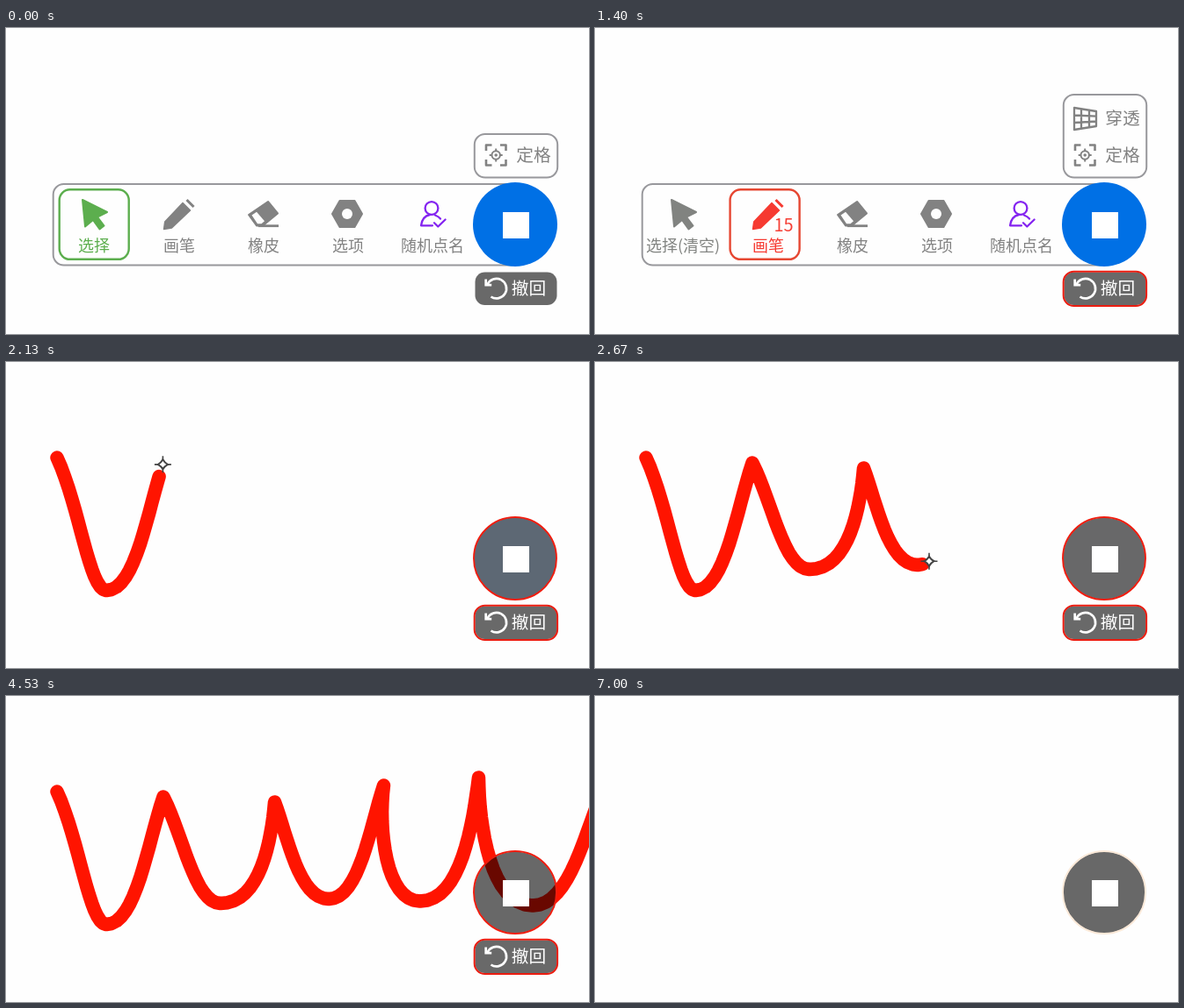
These frames come from a looping animation (663 by 349 pixels, 7070 ms). An HTML page:

```html
<!DOCTYPE html>
<html lang="zh-CN">
<head>
<meta charset="utf-8">
<title>画笔工具栏</title>
<style>
  html, body { margin: 0; width: 663px; height: 349px; overflow: hidden; background: #fefefe; }
  svg { display: block; font-family: "Noto Sans CJK SC", "Noto Sans CJK", "Noto Sans", sans-serif; }
  text { text-anchor: middle; font-size: 18px; stroke: none; }
  .big { font-size: 19.7px; }
  .line { fill: none; }
  .frame { fill: #fefefe; stroke: #98989c; stroke-width: 2; }
  .item { fill: currentColor; stroke: currentColor; stroke-width: 0; stroke-linejoin: round; color: #828282; }
</style>
</head>
<body>
<svg width="663" height="349" viewBox="0 0 663 349">
  <rect id="bar" class="frame" y="178" height="92.5" rx="12"/>

  <g id="random" class="item">
    <g class="line" stroke="#8424f0" stroke-width="2.3" stroke-linecap="round">
      <circle cx="484" cy="205.5" r="7.4"/>
      <path d="M485 225.3H472C473 218 477 214 482 213M488 213.5Q492 215 494 217.5M487 222.3l4.3 4.2 8.3-8"/>
    </g>
    <text x="485" y="254.5">随机点名</text>
  </g>
  <g id="option" class="item">
    <path d="M379.5 197h17l8.5 15-8.5 15h-17l-8.5-15z" stroke-width="2"/>
    <circle cx="388" cy="212" r="6" fill="#fefefe" stroke="none"/>
    <text x="389" y="254.5">选项</text>
  </g>
  <g id="eraser" class="item">
    <path d="M276 213l22-15 11 13.5-17 14h-7z" stroke-width="2"/>
    <path d="M279.5 213.5l5.5-3.7 9 10.5-3.5 3H286z" fill="#fefefe" stroke="none"/>
    <path d="M287 225.7H310" stroke-width="2.8"/>
    <text x="293" y="254.5">橡皮</text>
  </g>
  <g id="select" class="item">
    <path d="M87 196l28 14-11 5.5 7.5 10-5 4-7.5-10.5-9 7.5z" stroke-width="2"/>
    <text id="selectLabel" x="100" y="254.5"></text>
  </g>
  <g id="pen" class="item">
    <path d="M179.5 229.5l1.2-8.5 20.3-21.5 8.5 8.5-21 20z" stroke-width="1.5"/>
    <path d="M205.5 196l8 8" stroke-width="3"/>
    <text x="197" y="254.5">画笔</text>
    <text id="size" x="214.5" y="231.5" style="font-size:20px">15</text>
  </g>
  <rect id="pick" class="line" y="184.3" width="79" height="79.5" rx="12" stroke-width="2.4"/>

  <g id="panel">
    <rect id="panelBox" class="frame" x="532.8" width="94.4" rx="12"/>
    <g class="item">
      <g class="line" stroke-width="2.6">
        <path d="M546 140v-6.5h6.5M562 133.5h6.5v6.5M568.5 150v6.5h-6.5M552.5 156.5h-6.5v-6.5"/>
        <path d="M557.2 137.5v3M557.2 149.5v3M549.7 145h3M561.7 145h3" stroke-width="2"/>
        <circle cx="557.2" cy="145" r="4.7" stroke-width="2"/>
      </g>
      <circle cx="557.2" cy="145" r="1.8"/>
      <text class="big" x="600" y="152">定格</text>
    </g>
    <g id="through" class="item">
      <path class="line" stroke-width="2.3" d="M545 91l25 4v17l-25 4zM553 92.3v22.4M562 93.7v19.6M545 99.5l25 1.2M545 108l25-1.5"/>
      <text class="big" x="600" y="110">穿透</text>
    </g>
  </g>

  <path id="ink" class="line" stroke="#ff1400" stroke-width="15.5" stroke-linecap="round" stroke-linejoin="round"/>

  <circle id="button" cx="579" cy="224" r="48"/>
  <circle id="ring" class="line" cx="579" cy="224" r="47" stroke-width="1.9"/>
  <rect x="565" y="210" width="30" height="30" fill="#fff"/>

  <g id="undo">
    <rect x="533.5" y="278.5" width="93" height="37.5" rx="11" fill="#696969"/>
    <rect id="undoEdge" class="line" x="532.7" y="277.8" width="94.4" height="39.2" rx="12" stroke="#eb1c10" stroke-width="2"/>
    <g class="line" stroke="#fff" stroke-width="2.7">
      <path d="M547.5 292.5A11.3 11.3 0 1 1 551.5 306.5"/>
      <path d="M545.7 286.5v6.7h6.5"/>
    </g>
    <text class="big" x="594.5" y="303.5" fill="#fff">撤回</text>
  </g>

  <g id="cursor" fill="#fff" stroke="#444" stroke-width="2">
    <path d="M0-9.5v5M0 4.5v5M-9.5 0h5M4.5 0h5" stroke-width="1.6"/>
    <path d="M0-5.5Q2-2 5.5 0Q2 2 0 5.5Q-2 2-5.5 0Q-2-2 0-5.5z"/>
  </g>
</svg>
<script>
const LOOP = 7070, TICK = 200 / 3;
const PICK = 1000, FOLD = 1670, DRAW = 1810, UNDO = 6530;
const GREEN = [92, 174, 78], GREY = [130, 130, 130], RED = [250, 56, 46];
const INK = [240, 28, 14], CREAM = [251, 233, 216];
const ITEMS = ['select', 'pen', 'eraser', 'option', 'random'];

// Turning points of the stroke: x, y and how far each swing bows outwards
const TURNS = [
  [58, 109, 0], [114, 260.5, 0.44], [179, 115, 0.62], [244, 236.5, 0.55], [305.5, 121, 0.84], [367, 231.5, 0.65],
  [429.5, 102, 0.65], [471, 234, 1.05], [537.5, 93, 0.8], [599, 239, 0.89], [682, 100, 0.62]
];
const SWINGS = TURNS.length - 1;

const $ = id => document.getElementById(id);
const set = (id, attrs) => { for (const k in attrs) $(id).setAttribute(k, attrs[k]); };
const show = (id, on) => set(id, { visibility: on ? 'visible' : 'hidden' });
const clamp = (v, lo = 0, hi = 1) => Math.max(lo, Math.min(hi, v));
const settle = (t, start, tau) => t < start ? 0 : 1 - Math.exp((start - t) / tau);
const mix = (a, b, p) => `rgb(${a.map((v, i) => v + (b[i] - v) * p)})`;
const bezier = (a, b, c, d, s) => {
  const r = 1 - s;
  return a * r * r * r + 3 * b * r * r * s + 3 * c * r * s * s + d * s * s * s;
};

// Each swing is a cubic, flat at its trough and steep at its peak
function pointAt(u) {
  const i = Math.min(Math.floor(u), SWINGS - 1), falling = i % 2 === 0;
  const bow = TURNS[i + 1][2];
  const [peak, trough] = falling ? [TURNS[i], TURNS[i + 1]] : [TURNS[i + 1], TURNS[i]];
  const dx = peak[0] - trough[0], dy = peak[1] - trough[1];
  const s = falling ? 1 - (u - i) : u - i;
  return [
    bezier(trough[0], trough[0] + (bow - 0.1) * dx, trough[0] + (bow + 0.1) * dx, peak[0], s),
    bezier(trough[1], trough[1], trough[1] + 0.63 * dy, peak[1], s)
  ];
}

function trace(end) {
  const pts = [];
  for (let k = 0; k / 16 < end; k++) pts.push(pointAt(k / 16));
  pts.push(pointAt(end));
  return 'M' + pts.map(p => p.map(v => v.toFixed(1))).join('L');
}

function drawBar(t) {
  const picked = t >= PICK - 1;
  const p = picked ? settle(t, 930, 137) : 0;
  const slow = picked ? settle(t, 930, 230) : 0;
  const fold = settle(t, FOLD, 252);
  const fade = clamp(1 - (t - FOLD) / 370), dim = Math.sqrt(fade);
  const shift = i => (504 - 96.3 * i) * fold;

  ITEMS.forEach((id, i) => set(id, { transform: `translate(${shift(i)} 0)`, opacity: fade }));
  $('select').style.color = mix(GREEN, GREY, p);
  $('pen').style.color = mix(GREY, RED, p);
  $('selectLabel').textContent = picked ? '选择(清空)' : '选择';
  set('size', { opacity: p });

  const left = 53.7 + 500 * fold;
  set('bar', { x: left, width: Math.max(0, 585 - left), opacity: dim });
  set('pick', { x: 60.7 + 96 * p + shift(1), stroke: mix(GREEN, RED, slow), opacity: dim });

  set('panelBox', { y: picked ? 76 : 121, height: picked ? 94.5 : 49.5 });
  set('panel', { opacity: clamp(1 - (t - FOLD) / 130) });
  show('through', picked);
  show('undoEdge', picked);
}

function drawButton(t) {
  const p = settle(t, 1755, 165);
  const gone = clamp((t - UNDO + 60) / 530);
  const alpha = 1 - 0.412 * p;
  const tint = [0, 112, 229].map(v => v * (1 - p) / alpha);
  set('button', { fill: `rgba(${tint},${alpha})`, r: 48 - 1.4 * p });
  set('ring', { stroke: mix(INK, CREAM, gone), opacity: clamp((t - 1800) / 300) });
  set('undo', { opacity: 1 - gone });
}

function drawInk(t) {
  const u = clamp((t - DRAW) / 169.4, 0.03, SWINGS);
  const inked = t > DRAW - 20 && t < UNDO;
  show('ink', inked);
  if (inked) set('ink', { d: trace(u) });

  show('cursor', t > FOLD && t < 3460);
  set('cursor', { transform: `translate(${pointAt(Math.min(SWINGS, u + 0.08))})` });
}

const start = performance.now();
function render() {
  const now = (performance.now() - start) % LOOP;
  const t = Math.floor((now + 4) / TICK) * TICK;
  drawBar(t);
  drawButton(t);
  drawInk(t);
  requestAnimationFrame(render);
}
render();
</script>
</body>
</html>
```
